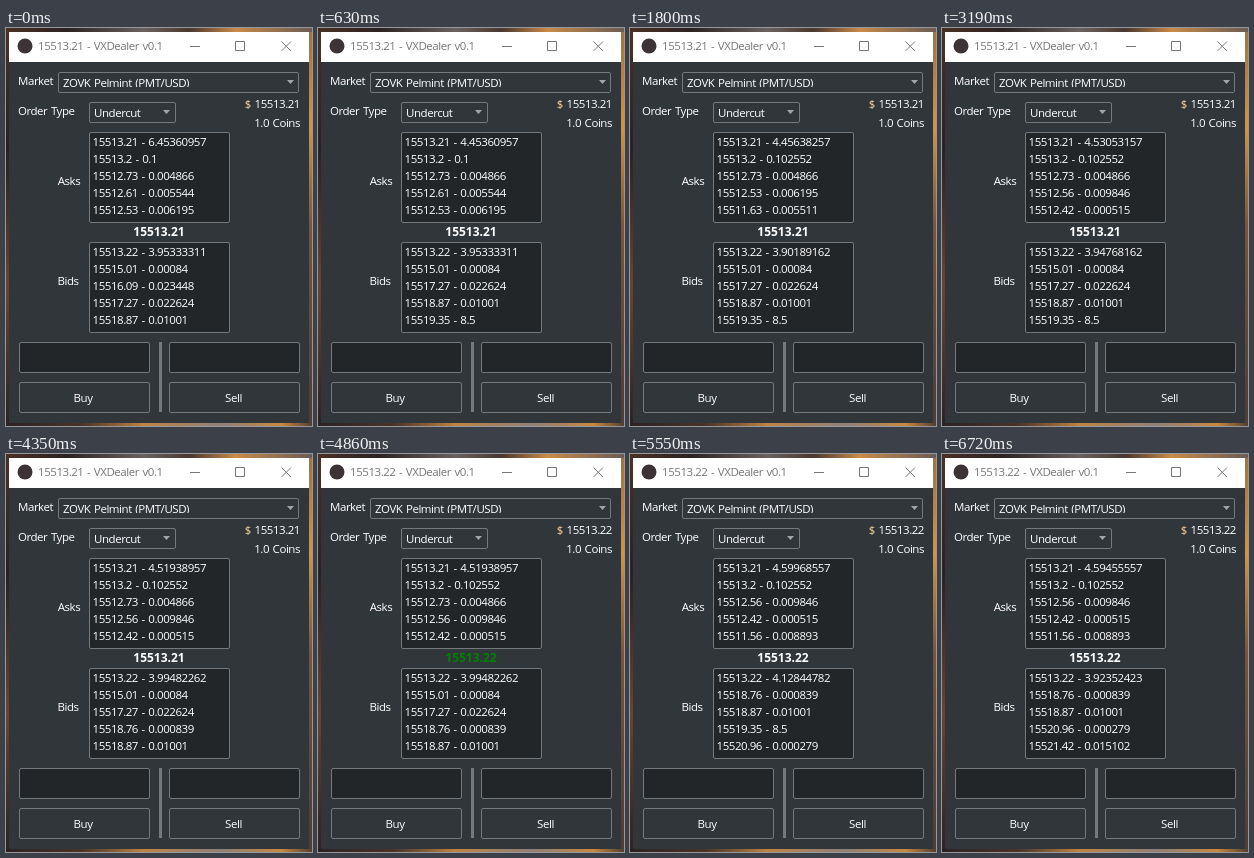
An HTML page for the animation above (8000 ms loop, 306 by 398 pixels).

```html
<!DOCTYPE html>
<html lang="en">
<head>
<meta charset="utf-8">
<title>Order book</title>
<style>
  html, body { margin: 0; width: 100%; height: 100%; overflow: hidden; background: #2b211e; }
  svg { display: block; width: 306px; height: 398px; }
  text {
    font: 11.5px "Open Sans", "Noto Sans", sans-serif;
    letter-spacing: -.45px; word-spacing: 1px;
    fill: #fff; white-space: pre;
  }
  .mid { text-anchor: middle; }
  .end { text-anchor: end; }
  .caption { fill: #777; }
  .last { font-weight: 700; font-size: 12px; letter-spacing: 0; }
  .box { fill: #31363b; stroke: #76797c; }
  .well { fill: #232629; }
  .ctl { fill: none; stroke: #777; }
</style>
</head>
<body>
<svg viewBox="0 0 306 398">
  <defs>
    <linearGradient id="top">
      <stop offset="0" stop-color="#4a3024"/>
      <stop offset=".2" stop-color="#2c2222"/>
      <stop offset=".45" stop-color="#6a625f"/>
      <stop offset=".6" stop-color="#4a372e"/>
      <stop offset=".75" stop-color="#c88a48"/>
      <stop offset="1" stop-color="#6b5c55"/>
    </linearGradient>
    <linearGradient id="left" x2="0" y2="1">
      <stop offset="0" stop-color="#4b3226"/>
      <stop offset=".3" stop-color="#2a2022"/>
      <stop offset=".65" stop-color="#6a4530"/>
      <stop offset="1" stop-color="#2c2222"/>
    </linearGradient>
    <linearGradient id="right" x2="0" y2="1">
      <stop offset="0" stop-color="#a0703f"/>
      <stop offset=".25" stop-color="#d4933f"/>
      <stop offset=".5" stop-color="#7a543a"/>
      <stop offset="1" stop-color="#4d3c36"/>
    </linearGradient>
    <linearGradient id="bottom">
      <stop offset="0" stop-color="#2c2222"/>
      <stop offset=".25" stop-color="#4a3428"/>
      <stop offset=".45" stop-color="#c08444"/>
      <stop offset=".7" stop-color="#8f8078"/>
      <stop offset=".9" stop-color="#c8883f"/>
      <stop offset="1" stop-color="#54402f"/>
    </linearGradient>
    <clipPath id="comboClip"><rect x="53" y="46" width="224" height="13"/></clipPath>
  </defs>

  <rect width="3" height="398" fill="url(#left)"/>
  <rect x="303" width="3" height="398" fill="url(#right)"/>
  <rect width="306" height="4" fill="url(#top)"/>
  <rect y="395" width="306" height="3" fill="url(#bottom)"/>
  <rect x="3" y="4" width="300" height="391" fill="#31363b"/>
  <rect x="3" y="4" width="300" height="30" fill="#fff"/>
  <circle cx="19" cy="18" r="7.5" fill="#3b3336"/>
  <text id="title" class="caption" x="32" y="22"></text>
  <path class="ctl" d="M184 18.5h10M229.5 13.5h9v9h-9zM275.5 13.5l9.5 9.5M285 13.5l-9.5 9.5"/>

  <g id="boxes"></g>
  <path d="M281 52h7l-3.5 4zM157 82h7l-3.5 4z" fill="#a3a6a8"/>
  <rect x="153" y="314" width="3" height="70" fill="#76797c"/>

  <text x="12" y="57">Market</text>
  <g clip-path="url(#comboClip)"><text x="57" y="59">ZOVK Pelmint (PMT/USD)</text></g>
  <text x="12" y="87">Order Type</text>
  <text x="88" y="89">Undercut</text>
  <text class="end" x="294" y="80"><tspan fill="#ffd39a">$</tspan> <tspan id="price"></tspan></text>
  <text class="end" x="294" y="99">1.0 Coins</text>
  <text class="mid" x="63" y="157">Asks</text>
  <text class="mid" x="62" y="257">Bids</text>
  <text id="last" class="last mid" x="153" y="208"></text>
  <text class="mid" x="77" y="374">Buy</text>
  <text class="mid" x="227.5" y="374">Sell</text>
  <g id="rows"></g>
</svg>
<script>
const NS = "http://www.w3.org/2000/svg";
const LOOP = 8000;
const $ = id => document.getElementById(id);

function add(parent, tag, attrs) {
  const el = document.createElementNS(NS, tag);
  for (const k in attrs) el.setAttribute(k, attrs[k]);
  return parent.appendChild(el);
}

function box(x, y, width, height, well) {
  add($("boxes"), "rect", {
    x: x + .5, y: y + .5, width, height, rx: 1.5, class: well ? "box well" : "box"
  });
}

box(52, 44, 240, 20);
box(83, 74, 86, 20);
box(83, 104, 140, 90, true);
box(83, 214, 140, 90, true);
for (const x of [13, 163]) {
  box(x, 314, 130, 30, true);
  box(x, 354, 130, 30);
}

const column = top => Array.from({ length: 5 }, (_, i) =>
  add($("rows"), "text", { x: 86.5, y: top + 17 * i }));
const askRows = column(118), bidRows = column(228);

// Entries below the best price, shared by consecutive book states
const asksA = ["15513.2 - 0.1", "15512.73 - 0.004866", "15512.61 - 0.005544", "15512.53 - 0.006195"];
const asksB = ["15513.2 - 0.102552", "15512.73 - 0.004866", "15512.53 - 0.006195", "15511.63 - 0.005511"];
const asksC = ["15513.2 - 0.102552", "15512.73 - 0.004866", "15512.56 - 0.009846", "15512.42 - 0.000515"];
const asksD = ["15513.2 - 0.102552", "15512.56 - 0.009846", "15512.42 - 0.000515", "15511.56 - 0.008893"];
const bidsA = ["15515.01 - 0.00084", "15516.09 - 0.023448", "15517.27 - 0.022624", "15518.87 - 0.01001"];
const bidsB = ["15515.01 - 0.00084", "15517.27 - 0.022624", "15518.87 - 0.01001", "15519.35 - 8.5"];
const bidsC = ["15515.01 - 0.00084", "15517.27 - 0.022624", "15518.76 - 0.000839", "15518.87 - 0.01001"];
const bidsD = ["15518.76 - 0.000839", "15518.87 - 0.01001", "15519.35 - 8.5", "15520.96 - 0.000279"];
const bidsE = ["15518.76 - 0.000839", "15518.87 - 0.01001", "15520.96 - 0.000279", "15521.42 - 0.015102"];

// start ms, last price, best ask size, other asks, best bid size, other bids, price colour
const WHITE = "#fff", UP = "#008000";
const steps = [
  [0,    "15513.21", "6.45360957", asksA, "3.95333311", bidsA, WHITE],
  [630,  "15513.21", "4.45360957", asksA, "3.95333311", bidsB, WHITE],
  [1800, "15513.21", "4.45638257", asksB, "3.90189162", bidsB, WHITE],
  [3190, "15513.21", "4.53053157", asksC, "3.94768162", bidsB, WHITE],
  [4350, "15513.21", "4.51938957", asksC, "3.99482262", bidsC, WHITE],
  [4860, "15513.22", "4.51938957", asksC, "3.99482262", bidsC, UP],
  [5550, "15513.22", "4.59968557", asksD, "4.12844782", bidsD, WHITE],
  [6720, "15513.22", "4.59455557", asksD, "3.92352423", bidsE, WHITE]
];

function fill(rows, lines) {
  rows.forEach((row, i) => { row.textContent = lines[i]; });
}

function show([, price, ask, asks, bid, bids, colour]) {
  $("title").textContent = price + " - VXDealer v0.1";
  $("price").textContent = price;
  $("last").textContent = price;
  $("last").style.fill = colour;
  fill(askRows, ["15513.21 - " + ask, ...asks]);
  fill(bidRows, ["15513.22 - " + bid, ...bids]);
}

const begin = performance.now();
let current;

function draw(now) {
  const t = Math.max(0, now - begin) % LOOP;
  const step = steps.findLast(s => s[0] <= t);
  if (step !== current) show(current = step);
  requestAnimationFrame(draw);
}
draw(begin);
</script>
</body>
</html>
```
